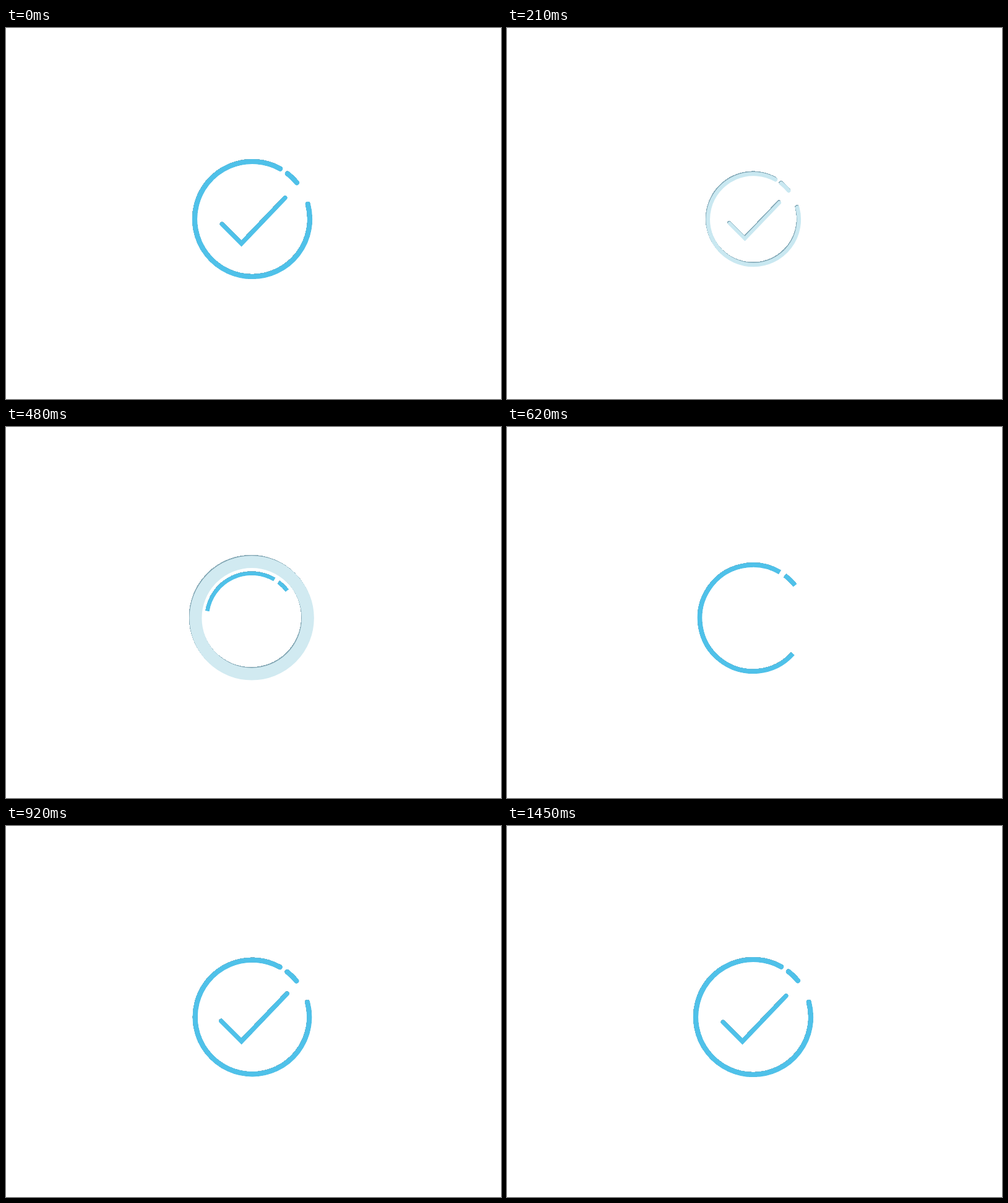
An HTML page that plays this animation: 800x600 px, repeating every 1490 ms.

```html
<!DOCTYPE html>
<html lang="en">
<head>
<meta charset="utf-8">
<title>Check mark</title>
<style>
  html, body { margin: 0; width: 100%; height: 100%; overflow: hidden; background: #fff; }
  svg { display: block; width: 100vw; height: 100vh; }
</style>
</head>
<body>
<svg viewBox="0 0 800 600" fill="none">
  <defs>
    <g id="mark">
      <path id="ring" stroke-width="8.2"/>
      <path id="dash" stroke-width="8.2"/>
      <path id="tick" d="M-31.3 -31.3L0 0L70.5 -73.8" stroke-width="7.2" stroke-linecap="round" stroke-miterlimit="8"/>
    </g>
    <circle id="wave"/>
  </defs>
  <use id="waveEdge" href="#wave" stroke="#86a9b6" shape-rendering="crispEdges"/>
  <use id="waveFace" href="#wave"/>
  <use id="markEdge" href="#mark" stroke="#86aab8" shape-rendering="crispEdges"/>
  <use id="markFace" href="#mark"/>
</svg>
<script>
const LOOP = 1490, CX = 398, CY = 309, RADIUS = 93;
const BLUE = [79, 193, 233], TEAL = [78, 174, 201];
const START = 61, SWEEP = 314;
const el = id => document.getElementById(id);
const clamp = x => Math.max(0, Math.min(1, x));
const part = (t, a, b) => clamp((t - a) / (b - a));
const smooth = p => p * p * (3 - 2 * p);
const mix = (a, b, p) => a + (b - a) * p;
const set = (id, attrs) => {
  for (const k in attrs) el(id).setAttribute(k, attrs[k]);
};
const tint = (color, a) => `rgb(${color.map(c => Math.round(mix(255, c, a)))})`;

// Eased value through [time, value] keys
function keyed(t, keys) {
  for (let i = 1; i < keys.length; i++) {
    const [t0, v0] = keys[i - 1], [t1, v1] = keys[i];
    if (t < t1) return mix(v0, v1, smooth(part(t, t0, t1)));
  }
  return keys[keys.length - 1][1];
}

// Counter-clockwise arc between two angles in degrees
function arc(from, to) {
  const point = deg => {
    const a = deg * Math.PI / 180;
    return `${(RADIUS * Math.cos(a)).toFixed(3)} ${(-RADIUS * Math.sin(a)).toFixed(3)}`;
  };
  const large = to - from > 180 ? 1 : 0;
  return `M${point(from)}A${RADIUS} ${RADIUS} 0 ${large} 0 ${point(to)}`;
}

function markScale(t) {
  if (t < 360) return mix(1, 0.725, smooth(part(t, 20, 300)));
  if (t < 920) return 1 - 0.22 * Math.exp(-0.0077 * (t - 480));
  return keyed(t, [[920, 0.9925], [1150, 1.0105], [1400, 1]]);
}

function drawMark(t) {
  const leaving = t < 360;
  const alpha = leaving ? 1 - part(t, 20, 295) : t > 410 ? 1 : 0;
  const p = part(t, 410, 777);
  const drawn = leaving ? 1 : 1 - (1 - p) * (1 - p);
  const flat = !leaving && t < 720;
  const cap = flat ? "butt" : "round";
  const from = flat ? START - 1.3 : START;

  set("ring", { d: arc(from, START + Math.max(0.5, SWEEP * drawn)), "stroke-linecap": cap });
  set("dash", { d: flat ? arc(38, 53.4) : arc(39.3, 52.2), "stroke-linecap": cap });

  const tick = leaving ? 1 : keyed(t, [[700, 0], [890, 1.055], [1150, 0.964], [1400, 1]]);
  set("tick", {
    transform: `translate(-17.5 39.5) scale(${tick})`,
    visibility: tick > 0.01 ? "visible" : "hidden"
  });

  // The face sinks away from its edge as it fades; growth is anchored slightly off centre
  const s = markScale(t);
  const sink = 1 - alpha;
  const grow = leaving ? 0 : s - 1;
  const place = d => `translate(${CX + 4 * grow + d * 0.6} ${CY - 1.5 * grow + d}) scale(${s})`;
  set("markEdge", { transform: place(-0.25 - 0.8 * sink), opacity: clamp(alpha * 4) });
  set("markFace", {
    transform: place(0.8 * sink),
    stroke: tint(BLUE.map((c, i) => mix(TEAL[i], c, alpha)), alpha),
    opacity: alpha > 0 ? 1 : 0
  });
}

function drawWave(t) {
  const p = part(t, 300, 600);
  const on = p > 0 && t < 580;
  const outer = 119.4 * (1 - (1 - p) * (1 - p));
  const width = Math.min(50 * (1 - p), outer);
  set("wave", { r: outer - width / 2, "stroke-width": width });
  set("waveEdge", { transform: "translate(396.2 307.4)", opacity: on ? clamp((1 - p) * 2.8) : 0 });
  set("waveFace", {
    transform: "translate(397.2 308.9)",
    stroke: tint(TEAL, 0.65 * (1 - p)),
    opacity: on ? 1 : 0
  });
}

function render(t) {
  drawWave(t);
  drawMark(t);
}

const begin = performance.now();
function frame() {
  render(Math.max(0, performance.now() - begin) % LOOP);
  requestAnimationFrame(frame);
}
render(0);
requestAnimationFrame(frame);
</script>
</body>
</html>
```
